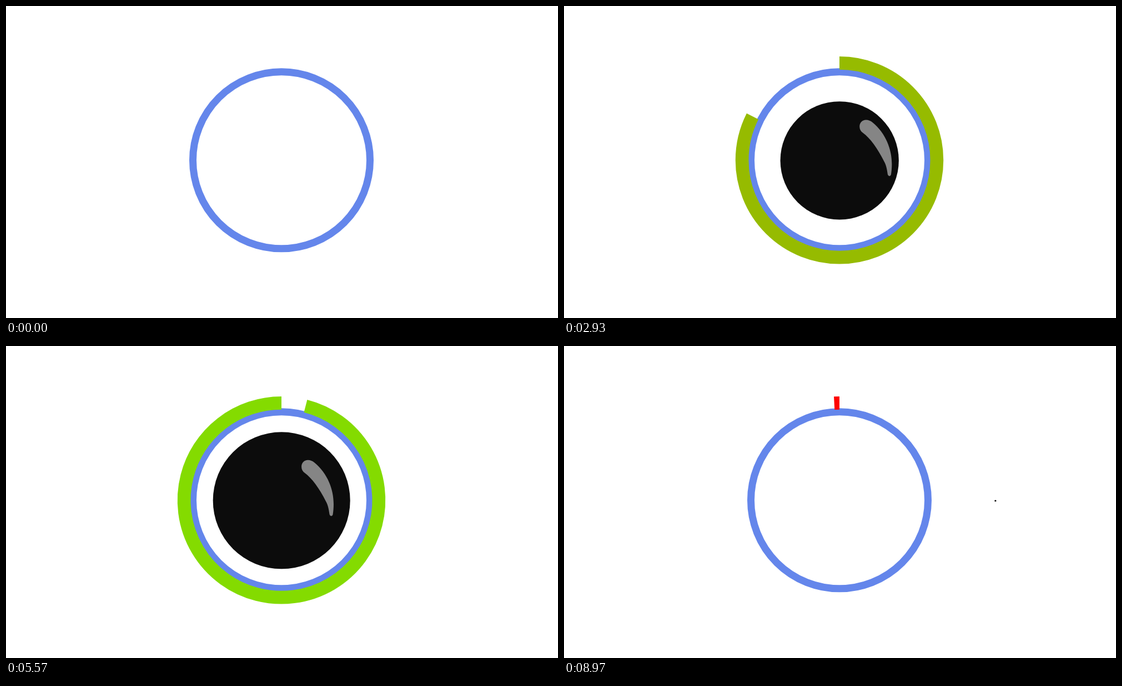
An HTML page with a canvas that plays this animation: 994x563 px, repeating every 9.01 s.

```html
<!DOCTYPE html>
<html lang="en">
<head>
<meta charset="utf-8">
<title>Filling ring</title>
<style>
  html, body { margin: 0; width: 100%; height: 100%; overflow: hidden; background: #fff; }
  canvas { display: block; }
</style>
</head>
<body>
<canvas id="stage" width="994" height="563"></canvas>
<script>
const ctx = document.getElementById('stage').getContext('2d');
const LOOP = 9010, CX = 496.2, CY = 278.3;
const BEAT = 15, BALLS = 8, STEP = 64 / 3, BALL_R = 32;
const OUT = 150; // frame where the balls start to leave
const BLACK = '#0c0c0c';

const clamp = x => Math.min(1, Math.max(0, x));
const lerp = (a, b, x) => a + (b - a) * x;
const smooth = x => { x = clamp(x); return x * x * (3 - 2 * x); };

function bezier(x1, y1, x2, y2, x) {
  const at = (a, b, s) => 3 * a * s * (1 - s) ** 2 + 3 * b * s * s * (1 - s) + s ** 3;
  let lo = 0, hi = 1;
  for (let i = 0; i < 30; i++) {
    const mid = (lo + hi) / 2;
    if (at(x1, x2, mid) < x) lo = mid; else hi = mid;
  }
  return at(y1, y2, (lo + hi) / 2);
}

// keys: [position, value] pairs, eased between neighbours
function track(keys, x) {
  for (let i = 1; i < keys.length; i++) {
    const [a, va] = keys[i - 1], [b, vb] = keys[i];
    if (x <= b) return lerp(va, vb, smooth((x - a) / (b - a)));
  }
  return keys[keys.length - 1][1];
}

function disc(x, y, r) {
  if (r <= 0) return;
  ctx.fillStyle = BLACK;
  ctx.beginPath();
  ctx.arc(x, y, r, 0, Math.PI * 2);
  ctx.fill();
}

function stroke(radius, width, color, from, to) {
  ctx.lineWidth = width;
  ctx.strokeStyle = color;
  ctx.beginPath();
  ctx.arc(496, CY, radius, from, to);
  ctx.stroke();
}

function shine(size) {
  if (size <= 0) return;
  ctx.save();
  ctx.translate(496, 279);
  ctx.scale(size / 156, size / 156);
  ctx.fillStyle = '#858585';
  ctx.beginPath();
  ctx.moveTo(53, -90);
  ctx.bezierCurveTo(53, -100, 60, -107.5, 70, -107.5);
  ctx.bezierCurveTo(76, -107.5, 82, -105, 87, -101);
  ctx.bezierCurveTo(122, -72, 138, -30, 138, 9);
  ctx.bezierCurveTo(138, 20, 137, 29, 136, 36);
  ctx.bezierCurveTo(135, 42.5, 128.5, 42.5, 127, 36);
  ctx.bezierCurveTo(125, 22, 123, 12, 118, 3);
  ctx.bezierCurveTo(100, -33, 80, -60, 62, -73);
  ctx.bezierCurveTo(56, -77, 53, -83, 53, -90);
  ctx.fill();
  ctx.restore();
}

// Radius of the middle ball and size of its shine while it grows
function growing(f) {
  const k = Math.min(BALLS, Math.floor((f + 2) / BEAT));
  if (k < 1) return [0, 0];
  const q = f + 2 - k * BEAT;
  const prev = STEP * (k - 1), next = STEP * k, peak = 10.9 + 29.1 * k;
  const r = q < 2
    ? lerp(prev, peak, (q / 2) ** 0.8)
    : lerp(next, peak, (1 - clamp((q - 2) / 10)) ** 3);
  return [r, lerp(prev, next, clamp(q / 3))];
}

function shrinking(g) {
  const k = Math.floor(g / BEAT) + 1, q = g % BEAT;
  const prev = STEP * (BALLS + 1 - k), next = STEP * (BALLS - k);
  return [
    track([[0, prev], [2, next * 0.965], [7, next * 1.125], [10, next]], q),
    track([[0, prev], [2, next * 0.83], [7, next * 0.99], [10, next]], q)
  ];
}

function draw(f) {
  const leaving = f >= OUT, g = f - OUT;
  const u = clamp((leaving ? g : f) / 120);
  const beat = ((leaving ? g : f) % BEAT) / BEAT;

  ctx.fillStyle = '#fff';
  ctx.fillRect(0, 0, 994, 563);

  if (leaving) {
    disc(496 + 284.5 * smooth(beat), 279.3, BALL_R * smooth((1 - beat) * 2));
  } else if (f < BALLS * BEAT) {
    disc(496 - 313.3 * (1 - smooth(beat)), 279.3, BALL_R * smooth(beat * 2));
  }

  const [radius, size] = leaving ? shrinking(g) : growing(f);
  disc(CX, 278.8, radius);
  shine(size);

  stroke(159.5, 13, '#6486eb', 0, Math.PI * 2);

  const top = -Math.PI / 2, turn = Math.PI * 2;
  const full = leaving ? 1 - u : u;
  const color = `rgb(${Math.round(255 - 143 * full)},${Math.round(255 * full)},0)`;
  const from = leaving ? bezier(0.333, 0, 0.77, 0.77, u) : 0;
  const to = leaving ? 1 : smooth(u);
  if (to - from > 0.0001) stroke(175.4, 23.7, color, top + turn * from, top + turn * to);
}

function tick(now) {
  const t = Math.floor((now % LOOP) / 10) * 10;
  draw(Math.min(269, Math.floor((t + 5) * 0.03))); // 30 pictures a second
  requestAnimationFrame(tick);
}

draw(0);
requestAnimationFrame(tick);
</script>
</body>
</html>
```
